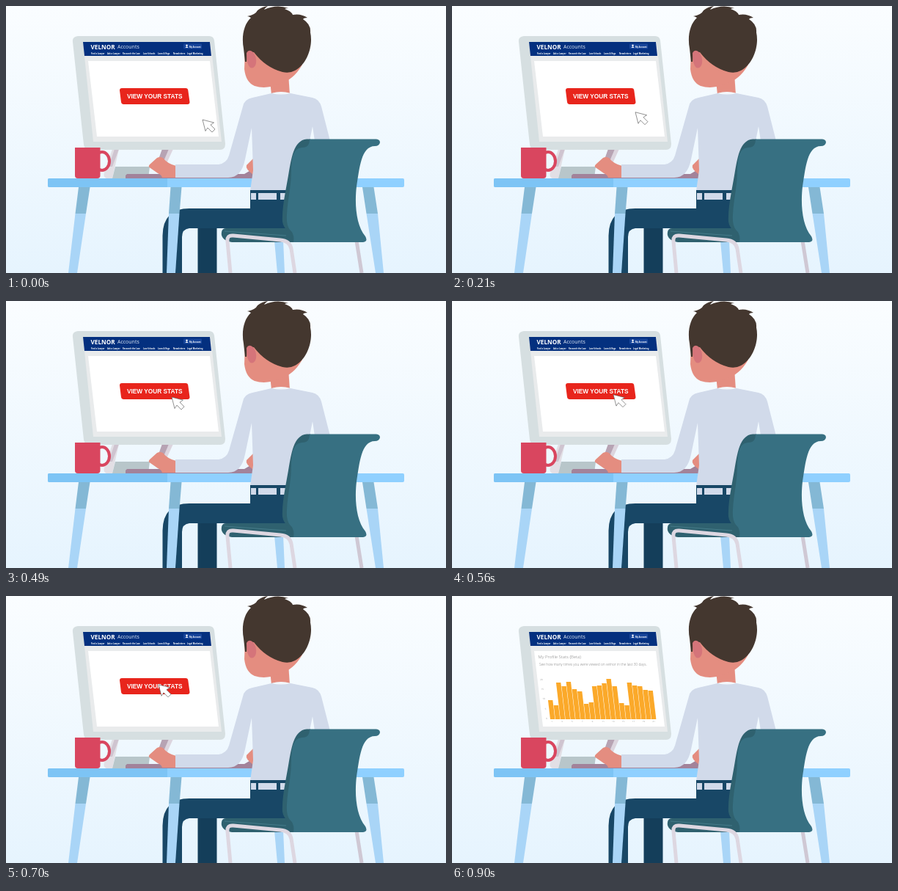
Write an HTML page that moves like this. It is 600 px wide and 364 px high and loops after 5.03 s.

```html
<!DOCTYPE html>
<html lang="en">
<head>
<meta charset="utf-8">
<title>View your stats</title>
<style>
  html, body { margin: 0; width: 100%; height: 100%; overflow: hidden; background: #e6f4fe; }
  svg { display: block; width: 600px; height: 364px; }
  text { font-family: "Open Sans", sans-serif; white-space: pre; }
  .skin { fill: #e48d80; }
  .shirt { fill: #d1daea; }
  .navy { fill: #184766; }
  .shade { fill: #84b8d5; }
  .leg { fill: #a9d5f7; }
  .dark { fill: #2f616f; }
  .tube { fill: none; stroke: #ddd7e1; stroke-width: 5; }
  .nav { font: bold 2.7px "Open Sans", sans-serif; fill: #fff; }
  .axis { font-size: 3px; fill: #999; }
</style>
</head>
<body>
<svg viewBox="0 0 600 364">
  <defs>
    <linearGradient id="sky" x2="0" y2="1">
      <stop stop-color="#fafdff"/><stop offset="1" stop-color="#e6f4fe"/>
    </linearGradient>
  </defs>
  <rect width="600" height="364" fill="url(#sky)"/>

  <!-- monitor stand and keyboard -->
  <path d="M145 195h9l-9 40h-8q-5-2-3-8z" fill="#e2dfe5"/>
  <path d="M148 195h6l-9 24h-5z" fill="#cfc4d0"/>
  <path d="M213 195h15l-13 28h-12z" fill="#dcd5de"/>
  <path d="M213 195h9l-12 28h-7z" fill="#b7a3b3"/>
  <path d="M149 219H196L194 235H145z" fill="#b8c6ca"/>
  <path d="M165 229H325L337 222V235H163V231z" fill="#a2839a"/>

  <!-- monitor -->
  <path d="M98 41H277Q283 41 284 47L299 188Q299 196 292 196H114Q107 196 106 189L91 49Q90 42 98 41z" fill="#d6dfe1"/>
  <path d="M105 49H279L294 185H119z" fill="#e9ebec"/>
  <path d="M105 49H278L280 68H107z" fill="#04307f"/>
  <path d="M112 75H278L290 178H124z" fill="#fff"/>
  <text x="115.500" y="58.500" font-size="8.200" font-weight="700" fill="#fff">VELNOR</text>
  <text x="152" y="58.300" font-size="7" fill="#e4ebf7">Accounts</text>
  <rect x="242" y="51.500" width="25" height="7" rx="1" fill="#17459a"/>
  <circle cx="246.500" cy="53.800" r="1.200" fill="#fff"/>
  <path d="M244.500 57q2-3.500 4 0z" fill="#fff"/>
  <text x="250" y="56.500" class="nav">My Account</text>
  <g id="nav"></g>

  <g id="prompt">
    <path d="M158 112H245Q248 112 248.300 115L250.500 131Q250.500 134 247.500 134H160.500Q157.500 134 157 131L155 115Q155 112 158 112z" fill="#e8251c"/>
    <text x="202.700" y="125.800" text-anchor="middle" fill="#fff" style="font:bold 8.300px 'Liberation Sans',sans-serif">VIEW YOUR STATS</text>
    <path id="cursor" d="M0 0L15.500 4L11 7L17 13L13 17L7 11L4 15.500z" fill="#fff" stroke="#555" stroke-width=".65"/>
  </g>

  <g id="stats">
    <text x="117.500" y="85.300" font-size="6" font-weight="300" fill="#777">My Profile Stats (Beta)</text>
    <text x="119" y="95.200" font-size="4.900" font-weight="300" fill="#777">See how many times you were viewed on velnor in the last 30 days.</text>
    <g id="chart" transform="translate(134 168) skewX(6.700)"></g>
  </g>

  <!-- mug -->
  <ellipse cx="131" cy="211.500" rx="10" ry="12.500" fill="none" stroke="#d9465f" stroke-width="4"/>
  <path d="M94 193H128.500V231Q128.500 235 124.500 235H98Q94 235 94 231z" fill="#d9465f"/>

  <!-- desk -->
  <path d="M99 247H114.500L109 283H94.500z" class="shade"/>
  <path d="M94.500 283H109L97 364H85z" class="leg"/>
  <path d="M486 247H501.500L507 283H491.500z" class="shade"/>
  <path d="M491.500 283H507L515 364H504z" class="leg"/>
  <path d="M366 320H378L380 364H370z" class="leg"/>
  <rect x="57" y="235" width="486" height="12" rx="2" fill="#8fd0ff"/>
  <path d="M59 235H220V247H59Q57 247 57 245V237Q57 235 59 235z" fill="#7dc4f5"/>

  <!-- head -->
  <path d="M360 102L385 92L387 121H362z" class="skin"/>
  <path d="M326 60L325 86Q327 104 339 109Q355 114 373 106Q392 101 404 80L370 45z" class="skin"/>
  <path d="M329 64L328 76H326L324 58C321 42 324 25 334 16Q331 14 329 14Q340 12 343 6Q349 1 357 0Q353 3 352 5Q369-3 385 3Q381 3 380 4Q389 7 391 12Q402 10 411 16Q406 16 405 18Q416 25 415 36C419 54 411 79 394 88Q387 92 377 90Q354 84 338 63z" fill="#44372f"/>
  <path d="M328 64Q331 58 337 63Q342 69 341 78Q339 86 333 84Q328 80 328 64z" fill="#d5747a"/>

  <!-- upper body -->
  <path d="M337 208L328 217Q326 222 337 230z" class="skin"/>
  <path d="M196 216L206 207Q210 205 214 207Q220 215 232 218V234H213Q212 230 207 228L197 221Q193 219 196 216z" class="skin"/>
  <path d="M362 119Q375 116 388 119L418 125Q427 127 430 137L442 184H421L418 164L414 184V252H333L337 224L335 166L326 209Q321 234 303 234H231V216H290Q301 214 304 204L323 137Q325 127 336 125z" class="shirt"/>
  <path d="M362 119Q375 115 388 119Q375 122 362 119z" fill="#f4f7fb"/>

  <!-- trousers -->
  <path d="M261.500 300H287.500V364H261.500z" fill="#143e5a"/>
  <path d="M333 251H390V303H250Q240 304 240 315V364H213.500V313Q214 276 250 276H333z" class="navy"/>
  <path d="M334 255h7v9h-7zM344 255h25v9h-25zM374 255h7v9h-7z" class="shirt"/>
  <path d="M224.500 247H239.500L236.500 283H222z" class="shade"/>
  <path d="M222 283H236.500L231 364H219z" class="leg"/>

  <!-- chair -->
  <path d="M300 303H392V322H308Q292 319 294 308Q295 303 300 303z" class="dark"/>
  <path d="M298 307L382 313" stroke="#447b89" fill="none"/>
  <path d="M478 320L485 364" class="tube" style="stroke:#cfc8d4"/>
  <path d="M306 364L302 321Q301 312 310 313L374 319Q387 320 389 331L394 364" class="tube"/>
  <path d="M415 181.500H410C392 183 389 208 385 231C381 254 376 276 377 294Q378 303 387 308Q391 312 389 322H410z" class="dark"/>
  <path d="M414 181.500H505Q510 182 510 186Q509 191 503 191C484 191 482 222 478 246C475 272 478 300 490 314Q494 321 487 322H392Q394 311 387 305Q382 299 383 284C384 263 389 247 389 224C390 202 393 194 404 193Q414 193 414 181.500z" fill="#377082"/>
</svg>

<script>
const LOOP = 5030, STEP = 70, PRESS = 830, REVEAL = 900, LAST_STEP = 10;
const byId = id => document.getElementById(id);

function add(parent, tag, attrs, text = "") {
  const node = document.createElementNS("http://www.w3.org/2000/svg", tag);
  for (const key in attrs) node.setAttribute(key, attrs[key]);
  node.textContent = text;
  parent.append(node);
}

const links = [
  [116, "Find a Lawyer"], [138, "Ask a Lawyer"], [159, "Research the Law"],
  [187, "Law Schools"], [207, "Laws & Regs"], [228, "Newsletters"], [247, "Legal Marketing"]
];
for (const [x, label] of links) add(byId("nav"), "text", { x, y: 66, class: "nav" }, label);

// Bars stand on the baseline of the slanted chart.
const chart = byId("chart");
const heights = [26, 19, 50, 45, 51, 41, 38, 21, 23, 45, 46, 49, 55, 45, 22, 19, 50, 46, 45, 40, 39];
const pitch = 6.9;
heights.forEach((height, i) => {
  add(chart, "rect", { x: i * pitch, y: -height, width: 6.4, height, fill: "#fba92a" });
  if (i % 2 === 0) add(chart, "text", { x: i * pitch + 1, y: 4.5, class: "axis" }, i + 1);
});
for (let i = 0; i < 5; i++) {
  add(chart, "text", { x: -4, y: -13.3 * i, class: "axis", "text-anchor": "end" }, i * 5);
}

function draw(now) {
  const t = now % LOOP;
  const step = Math.min(Math.floor(t / STEP), LAST_STEP);
  const scale = t >= PRESS ? 0.85 : 1;
  const done = t >= REVEAL;
  byId("cursor").setAttribute("transform", `translate(${268 - 6 * step} ${155 - 3.42 * step}) scale(${scale})`);
  byId("prompt").style.display = done ? "none" : "";
  byId("stats").style.display = done ? "" : "none";
}

const start = performance.now();
function tick() {
  draw(performance.now() - start);
  requestAnimationFrame(tick);
}
tick();
</script>
</body>
</html>
```
